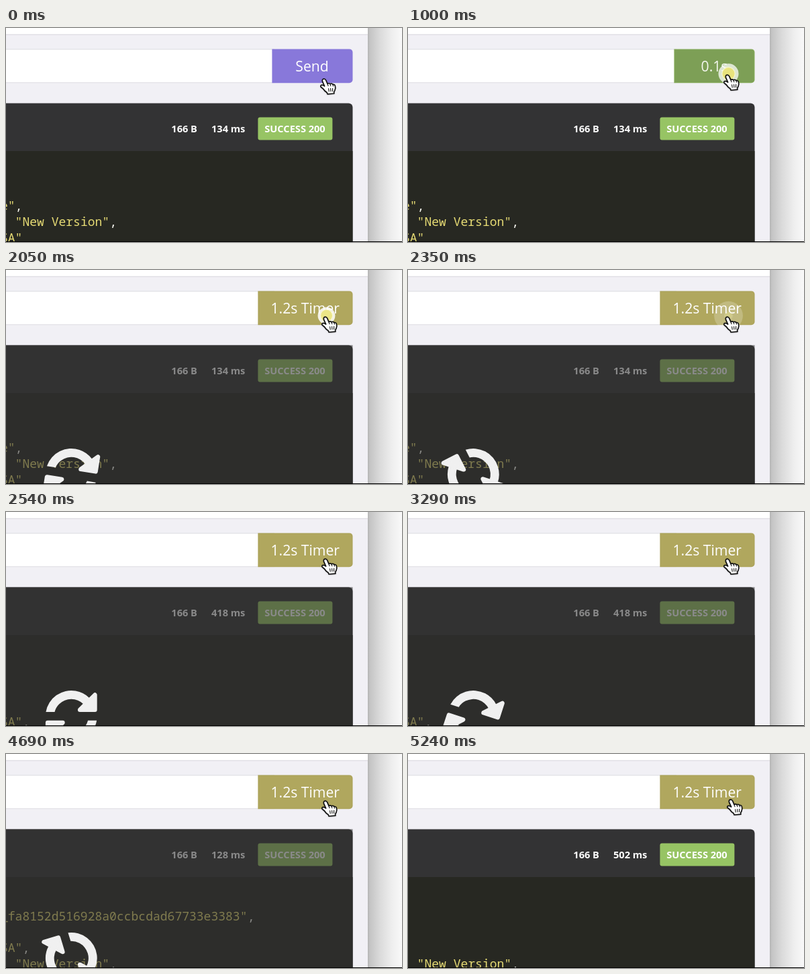
An HTML page with a canvas for the animation above (5290 ms loop, 590x320 px).

```html
<!DOCTYPE html>
<html lang="en">
<head>
<meta charset="utf-8">
<title>Repeat timer on a Send button</title>
<style>
  html, body { margin: 0; width: 100%; height: 100%; overflow: hidden; background: #f1f0f5; }
  canvas { display: block; width: 590px; height: 320px; }
</style>
</head>
<body>
<canvas id="stage" width="590" height="320"></canvas>
<script>
const ctx = document.getElementById('stage').getContext('2d');
const LOOP = 5290;
const UI = '"Open Sans", "Noto Sans", sans-serif';
const MONO = '"Noto Sans Mono", "DejaVu Sans Mono", monospace';
const CELL = 10.82;
const CODE_X = 13.6;
const RIGHT = 516.5;
const PANEL_TOP = 112.4;
const CLICK = { x: 477.5, y: 68.3 };

// Response bodies: [grid column, baseline, string, has comma]
const responses = [
  { ms: 134, lines: [[-2, 272.3, 'e"', true], [0, 296.1, '"New Version"', true], [-2, 319.6, 'SA"', false]] },
  { ms: 418, lines: [[-2, 319.6, 'SA"', true]] },
  { ms: 128, lines: [[-2, 248.5, '_fa8152d516928a0ccbcdad67733e3383"', true],
                     [-2, 296.1, 'SA"', true], [0, 319.6, '"New Version"', true]] },
  { ms: 502, lines: [[0, 319.6, '"New Version"', true]] }
];

// Loading spans: the spinner holds its first angle until `spin`
const loads = [
  { from: 2000, spin: 2000, to: 2490, first: 0 },
  { from: 2540, spin: 3190, to: 3440, first: 0 },
  { from: 3490, spin: 4350, to: 4940, first: 12 }
];

const clamp = v => Math.max(0, Math.min(1, v));
const lerp = (a, b, p) => a + (b - a) * p;

function rect(x, y, w, h, color) {
  ctx.fillStyle = color;
  ctx.fillRect(x, y, w, h);
}

function roundRect(x, y, w, h, radii, color) {
  ctx.fillStyle = color;
  ctx.beginPath();
  ctx.roundRect(x, y, w, h, radii);
  ctx.fill();
}

function disc(x, y, r, color) {
  ctx.fillStyle = color;
  ctx.beginPath();
  ctx.arc(x, y, r, 0, Math.PI * 2);
  ctx.fill();
}

function text(str, x, y, font, color, align = 'left') {
  ctx.font = font;
  ctx.fillStyle = color;
  ctx.textAlign = align;
  ctx.fillText(str, x, y);
}

function drawWindow() {
  rect(0, 0, 590, 320, '#f1f0f5');
  rect(0, 0, 540, 9.4, '#fff');
  rect(0, 9.4, 540, 1, '#d9d8de');
  rect(0, 31.4, 400, 50.8, '#dddce2');
  rect(0, 32.4, 400, 48.8, '#fff');

  const shade = ctx.createLinearGradient(539, 0, 590, 0);
  shade.addColorStop(0, '#b4b4b4');
  shade.addColorStop(0.06, '#c4c4c4');
  shade.addColorStop(0.35, '#dadada');
  shade.addColorStop(0.7, '#eeeeee');
  shade.addColorStop(1, '#f9f9f9');
  rect(539, 0, 51, 320, shade);
}

function buttonBox(x, border, fill) {
  const w = RIGHT - x;
  roundRect(x, 31.4, w, 50.8, [0, 5, 5, 0], border);
  roundRect(x + 1, 32.4, w - 2, 48.8, [0, 4, 4, 0], fill);
}

function drawButton(t) {
  const font = '400 21.1px ' + UI;
  if (t < 750) {
    buttonBox(396.4, '#8878da', '#8878da');
    text('Send', 456, 64.5, font, '#fff', 'center');
  } else if (t < 2000) {
    const tenths = Math.max(0, Math.floor((t - 824) / 98));
    buttonBox(396.4, '#88ad5c', '#7d9f56');
    text((tenths / 10).toFixed(1) + 's', 456.5, 64.5, font, '#f4f7ef', 'center');
  } else {
    buttonBox(375.4, '#aaa157', '#b0a75e');
    text('1.2s Timer', 445.7, 64.5, font, '#fff', 'center');
  }
}

function drawResponse(res) {
  roundRect(0, PANEL_TOP, RIGHT, 320 - PANEL_TOP, [0, 6, 0, 0], '#333334');
  rect(0, 184, RIGHT, 136, '#272822');

  const bold = '700 14.6px ' + UI;
  text('166 B', 246.3, 155.8, bold, '#fff');
  text(res.ms + ' ms', 306, 155.8, bold, '#fff');
  roundRect(375.4, 133.4, 111, 34.2, 3, '#97c464');
  text('SUCCESS 200', 430.5, 155.8, bold, '#fff', 'center');

  const mono = '400 18.03px ' + MONO;
  for (const [col, y, str, comma] of res.lines) {
    const x = CODE_X + col * CELL;
    text(str, x, y, mono, '#e6db74');
    if (comma) text(',', x + str.length * CELL, y, mono, '#f8f8f2');
  }
}

function halfSpinner() {
  ctx.beginPath();
  ctx.arc(0, 0, 38.4, Math.PI + 0.167, Math.PI * 1.75);
  ctx.arc(0, 0, 25.6, Math.PI * 1.75, Math.PI + 0.253, true);
  ctx.closePath();
  ctx.fill();

  ctx.beginPath();
  ctx.moveTo(35.2, -32);
  ctx.lineTo(35.2, -9.6);
  ctx.lineTo(12.8, -9.6);
  ctx.closePath();
  ctx.fill();
  ctx.stroke();
}

function drawLoading(angle) {
  rect(0, PANEL_TOP, RIGHT, 320 - PANEL_TOP, 'rgba(50,50,50,0.57)');
  ctx.save();
  ctx.translate(97.3, 305.4);
  ctx.rotate(angle * Math.PI / 180);
  ctx.fillStyle = ctx.strokeStyle = '#f0f0f0';
  ctx.lineWidth = 6.4;
  ctx.lineJoin = 'round';
  halfSpinner();
  ctx.rotate(Math.PI);
  halfSpinner();
  ctx.restore();
}

function drawRipple(p) {
  if (p < 0 || p >= 1) return;
  const r = 10.5 + 11.5 * p * (2 - p);
  disc(CLICK.x, CLICK.y, r, `rgba(255,255,255,${0.95 * (1 - p)})`);
}

function drawPress(t) {
  drawRipple((t - 900) / 450);
  drawRipple((t - 2000) / 450);
  const out = clamp((t - 2000) / 450);
  if (t < 500 || out === 1) return;
  ctx.globalAlpha = 1 - out;
  disc(CLICK.x, CLICK.y, 10.3 - 5 * out, 'rgba(250,248,205,0.85)');
  disc(CLICK.x, CLICK.y, 9 - 5 * out, 'rgba(231,225,116,0.9)');
  ctx.globalAlpha = 1;
}

function cursorAt(t) {
  const rise = clamp((t - 50) / 200);
  const leave = clamp((t - 4740) / 200);
  const end = t < 5140 ? 0 : t < 5240 ? 3 : 2;
  return [lerp(474, 476, rise) + 3 * leave + end, lerp(77, 71.2, rise) - leave - end / 2];
}

const hand = new Path2D(
  'M-2.6 2.6Q-3.2-.6-.4-1Q1.8-1 2.6 1L5 6.4Q7 5 9 6.6' +
  'Q11.4 5.4 13 7.4Q15.6 6.8 16.4 9.4Q17.6 13 15.8 16.6L14.6 18.6L14.8 21' +
  'L5 21.8L4.2 19.6Q.6 17.4-1.6 13.8L-5 11Q-6 8.6-3.2 8.2Q-1 8.4 .6 10Z');
const creases = new Path2D('M5 6.4L6 9.6M9 6.6L9.8 9.6M13 7.4L13.4 10M6.6 13.6L7.2 17.8M9.6 13.4L10 17.6M12.6 13.2L12.6 17.4');

function drawCursor(t) {
  ctx.save();
  ctx.translate(...cursorAt(t));
  ctx.lineJoin = ctx.lineCap = 'round';
  ctx.shadowColor = 'rgba(0,0,0,0.35)';
  ctx.shadowBlur = 2;
  ctx.shadowOffsetY = 1;
  ctx.fillStyle = '#fff';
  ctx.fill(hand);
  ctx.shadowColor = 'transparent';
  ctx.strokeStyle = '#111';
  ctx.lineWidth = 1.7;
  ctx.stroke(hand);
  ctx.lineWidth = 1.1;
  ctx.stroke(creases);
  ctx.restore();
}

function tick(ms) {
  const base = ms < 2490 ? 0 : 2490;
  return base + Math.floor((ms - base) / 50) * 50;
}

function draw(ms) {
  const t = tick(ms);
  const load = loads.find(l => t >= l.from && t < l.to);
  const answered = loads.filter(l => t >= l.to).length;

  drawWindow();
  drawButton(t);
  drawResponse(responses[answered]);
  if (load) drawLoading(load.first + Math.max(0, t - load.spin) * 0.18);
  drawPress(t);
  drawCursor(t);
  rect(0, 319, 590, 1, '#000');
}

const start = performance.now();
function frame() {
  draw((performance.now() - start) % LOOP);
  requestAnimationFrame(frame);
}
frame();
</script>
</body>
</html>
```
